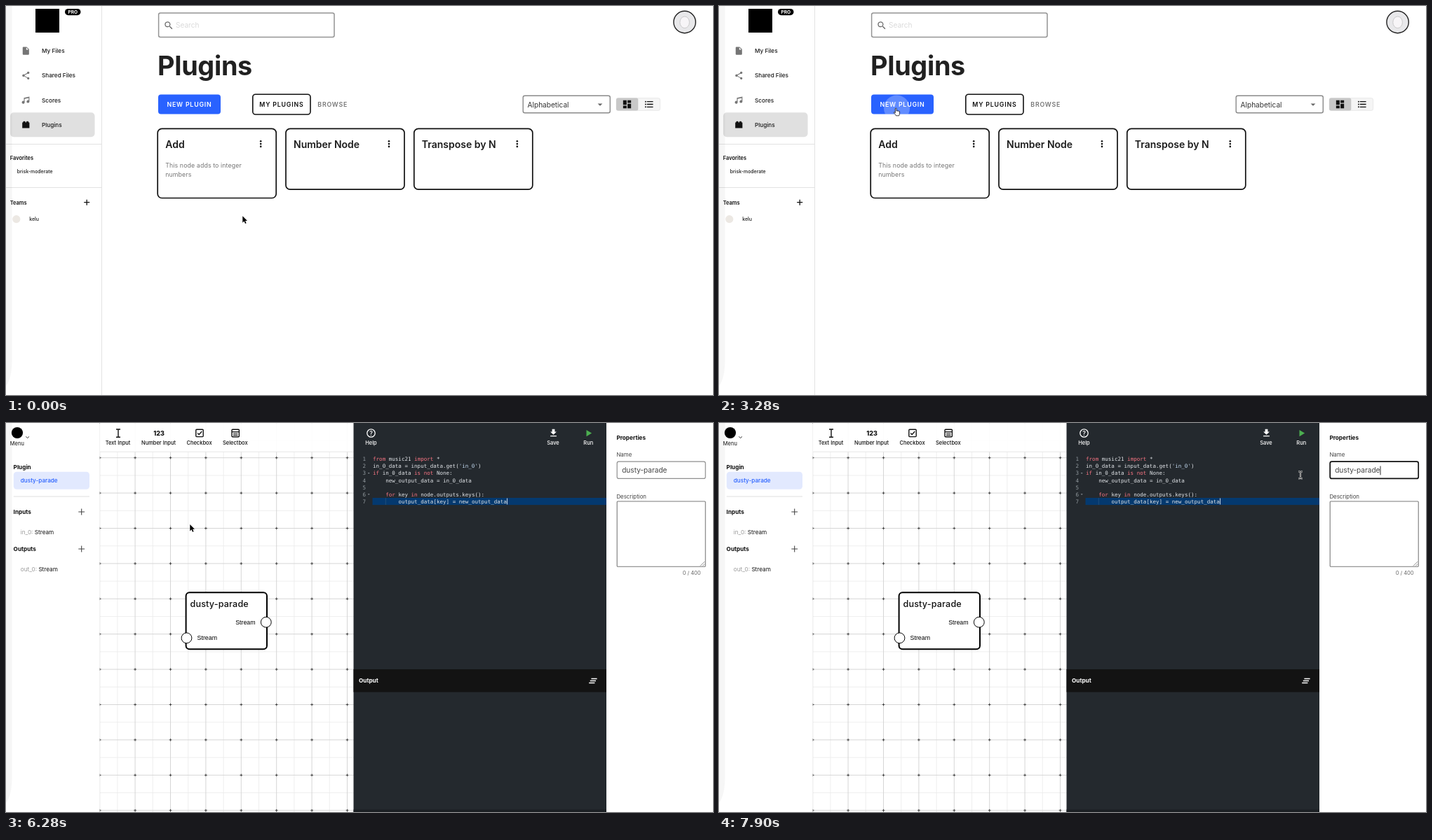
Recreate the animation shown at these times as an HTML page. Size 1008 by 556 pixels, loop 8 s.

```html
<!DOCTYPE html>
<html lang="en">
<head>
<meta charset="utf-8">
<title>Plugin editor</title>
<style>
html, body { margin: 0; width: 100%; height: 100%; overflow: hidden; background: #fff; }
svg { display: block; width: 100vw; height: 100vh; font-family: Inter, sans-serif; }
text { white-space: pre; }
.mono { font-family: "DejaVu Sans Mono", monospace; }
.sans { font-family: "Liberation Sans", Arial, sans-serif; }
</style>
</head>
<body>
<svg id="stage" viewBox="0 0 1008 556"></svg>
<script>
const LOOP = 8000;
const PLUGIN = 'dusty-parade';
const BLUE = '#2962ff';

// Drawing helpers
const text = (s, x, y, size, fill = '#111', weight = 400, extra = '') =>
  `<text x="${x}" y="${y}" font-size="${size}" fill="${fill}" font-weight="${weight}" ${extra}>${s}</text>`;
const mid = (s, x, y, size, fill, weight, extra = '') =>
  text(s, x, y, size, fill, weight, `text-anchor="middle" ${extra}`);
const box = (x, y, x2, y2, r, fill, stroke = 'none', width = 1, extra = '') =>
  `<rect x="${x}" y="${y}" width="${x2 - x}" height="${y2 - y}" rx="${r}" fill="${fill}" stroke="${stroke}" stroke-width="${width}" ${extra}/>`;
const line = (d, stroke, width = 1, extra = '') =>
  `<path d="${d}" fill="none" stroke="${stroke}" stroke-width="${width}" ${extra}/>`;
const dot = (x, y, r, fill, stroke = 'none', width = 1) =>
  `<circle cx="${x}" cy="${y}" r="${r}" fill="${fill}" stroke="${stroke}" stroke-width="${width}"/>`;
const icon = (d, x, y, size, fill) =>
  `<path transform="translate(${x - size / 2} ${y - size / 2}) scale(${size / 24})" d="${d}" fill="${fill}"/>`;
const plus = (x, y, r, color, width) =>
  line(`M${x - r} ${y}h${2 * r}M${x} ${y - r}v${2 * r}`, color, width);

const ICONS = {
  file: 'M13 9V3.5L18.5 9M6 2C4.9 2 4 2.9 4 4V20A2 2 0 0 0 6 22H18A2 2 0 0 0 20 20V8L14 2H6Z',
  share: 'M18 16.1C17.2 16.1 16.6 16.4 16 16.9L8.9 12.7Q9.1 12 8.9 11.3L16 7.2A3 3 0 1 0 15.1 5.7L8 9.8A3 3 0 1 0 8 14.2L15.2 18.3A2.9 2.9 0 1 0 18 16.1Z',
  music: 'M21 3V15.5A3.5 3.5 0 1 1 19 12.3V6.5L9 8.6V17.5A3.5 3.5 0 1 1 7 14.3V6L21 3Z',
  brick: 'M19 6V5A2 2 0 0 0 17 3H15A2 2 0 0 0 13 5V6H11V5A2 2 0 0 0 9 3H7A2 2 0 0 0 5 5V6H3V20H21V6Z',
  search: 'M9.5 3A6.5 6.5 0 0 1 14.4 13.7L14.7 14H15.5L20.5 19L19 20.5L14 15.5V14.7L13.7 14.4A6.5 6.5 0 1 1 9.5 3M9.5 5A4.5 4.5 0 1 0 9.5 14A4.5 4.5 0 1 0 9.5 5Z',
  board: 'M13 3V9H21V3M13 21H21V11H13M3 21H11V15H3M3 13H11V3H3Z',
  list: 'M7 5H21V7H7ZM7 11H21V13H7ZM7 17H21V19H7Z' +
    [6, 12, 18].map(y => `M4 ${y - 1.5}a1.5 1.5 0 1 1 0 3a1.5 1.5 0 1 1 0-3Z`).join(''),
  save: 'M5 20H19V18H5M19 9H15V3H9V9H5L12 16Z'
};

// Faint rounded edge at the left of the window
const edge = '<path d="M0 0H8.6V506Q8.6 532 0 543Z" fill="#000" opacity=".035"/>';

function card(x, bottom, title, lines = []) {
  return box(x, 175.3, x + 169, bottom, 6, '#fff', '#111', 1.7) +
    text(title, x + 11, 202.6, 14, '#1c1c1c', 600) +
    [193.3, 197.1, 200.9].map(y => dot(x + 147, y, 1.3, '#111')).join('') +
    lines.map((s, i) => text(s, x + 11, 231 + i * 12.6, 8.82, '#767676', 400, 'letter-spacing=".1"')).join('');
}

function library() {
  const nav = [['file', 'My Files'], ['share', 'Shared Files'], ['music', 'Scores'], ['brick', 'Plugins']];
  const caps = 'letter-spacing=".79"';
  return box(0, 0, 1008, 556, 0, '#fff') +
    box(6, 152.3, 126.5, 187.3, 5, '#e0e0e0') +
    line('M136.5 0V556M0 197.5H136M0 259.5H136', '#e2e2e2') +
    box(42, 4, 76, 38, 0, '#000') +
    box(84, 4, 106.5, 13.2, 4.6, '#000') +
    mid('PRO', 95.3, 11, 6.6, '#fff', 700) +
    nav.map(([name, label], i) => {
      const y = 64.1 + i * 35.25;
      return icon(ICONS[name], 28.3, y, 13.6, i === 3 ? '#111' : '#757575') +
        text(label, 51, y + 3, 8.19, '#1a1a1a', 500);
    }).join('') +
    text('Favorites', 5.7, 219.6, 7.5, '#111', 600) +
    text('brisk-moderate', 15.8, 238.5, 6.93, '#1a1a1a', 500) +
    text('Teams', 5.7, 283.5, 7.5, '#111', 600) +
    plus(115.2, 280.7, 4, '#111', 1.3) +
    dot(14.8, 304.6, 5.6, '#ece8e3') +
    text('kelu', 33.2, 307, 6.93, '#1a1a1a', 500) +
    edge +
    box(217.6, 10, 468, 44.4, 2.5, '#fff', '#949494', 1.5) +
    icon(ICONS.search, 232, 27.8, 15.1, '#666') +
    text('Search', 242, 31, 10.08, '#dadada') +
    dot(967.6, 23, 15.7, '#e8e8ea', '#222', 1.4) +
    '<ellipse cx="967.6" cy="23.3" rx="6.8" ry="8.3" fill="#f7f5f7" stroke="#bbb" stroke-width=".7"/>' +
    text('Plugins', 216, 99.3, 37.8, '#212121', 700, 'letter-spacing="-.3"') +
    `<rect id="button" x="217" y="126.5" width="89" height="28" rx="4"/>` +
    '<g clip-path="url(#buttonClip)"><circle id="ripple" cx="253.5" cy="146" fill="#fff" opacity=".26"/></g>' +
    text('NEW PLUGIN', 229.5, 143.9, 8.82, '#fff', 600, caps + ' id="buttonText"') +
    box(351.8, 126.2, 434, 155, 4, '#fff', '#111', 1.6) +
    text('MY PLUGINS', 361.3, 143.9, 8.82, '#111', 600, caps) +
    text('BROWSE', 444.3, 143.9, 8.82, '#777', 600, caps) +
    box(737.2, 128.2, 861.3, 152.8, 2.5, '#fff', '#8a8a8a', 1.4) +
    text('Alphabetical', 743.6, 144.6, 10.08, '#333') +
    '<path d="M843.6 139.4h6.8l-3.4 3.4Z" fill="#666"/>' +
    box(870.2, 131.7, 932.6, 149.3, 2.5, '#f5f5f5', '#e4e4e4', .8) +
    box(870, 131.4, 901.3, 149.6, 2.5, '#c8c8c8') +
    icon(ICONS.board, 885.5, 140.5, 15.1, '#111') +
    icon(ICONS.list, 916.9, 140.5, 15.1, '#111') +
    card(216.2, 274.5, 'Add', ['This node adds to integer', 'numbers']) +
    card(399, 262.2, 'Number Node') +
    card(581.8, 262.2, 'Transpose by N');
}

function grid() {
  const step = 50.4, x0 = 133.7, y0 = -0.7;
  let minor = '', major = '', marks = '';
  for (let i = 0; i < 8; i++) {
    const x = x0 + i * step;
    major += `M${x} 0V556`;
    minor += `M${x + step / 2} 0V556`;
    for (let j = 0; j < 12; j++) {
      const y = y0 + j * step;
      marks += `M${x - 1.8} ${y}h3.6M${x} ${y - 1.8}v3.6`;
    }
  }
  for (let j = 0; j < 12; j++) {
    const y = y0 + j * step;
    major += `M134 ${y}H496`;
    minor += `M134 ${y + step / 2}H496`;
  }
  return line(minor, '#ebebeb', .8) + line(major, '#d2d2d2', .9) + line(marks, '#444', 1);
}

function code() {
  const key = s => `<tspan fill="#f97583">${s}</tspan>`;
  const str = s => `<tspan fill="#c5dbf2">${s}</tspan>`;
  const rows = [
    `${key('from')} music21 ${key('import')} *`,
    `in_0_data = input_data.get(${str("'in_0'")})`,
    `${key('if')} in_0_data ${key('is not')} None:`,
    '  new_output_data = in_0_data',
    '',
    `  ${key('for')} key ${key('in')} node.outputs.keys():`,
    '    output_data[key] = new_output_data'
  ];
  const mono = 'class="mono"', w = 4.551;
  return box(522.5, 107, 856, 117.1, 0, '#04396f') +
    line('M541.3 107V117', '#2b5680', .7) +
    rows.map((row, i) => {
      const y = 54.3 + i * 10.08;
      const pad = row.length - row.trimStart().length;
      return text(i + 1, 513, y, 7.56, '#929a9f', 400, mono + ' text-anchor="end"') +
        (i === 2 || i === 5 ? `<path d="M515.7 ${y - 3.4}h3l-1.5 1.8Z" fill="#8a9196"/>` : '') +
        text(row.trimStart(), 523 + pad * 2 * w, y, 7.56, '#e1e4e8', 400, mono);
    }).join('') +
    line('M714.5 107.5V116.5', '#dfe6ee', .9);
}

function editor() {
  const tool = (s, x, fill = '#111') => mid(s, x, 31, 7.5, fill, 500);
  const port = (name, y) => text(`<tspan fill="#999">${name}:</tspan> Stream`, 20.8, y, 8.19, '#111');
  return box(0, 0, 1008, 556, 0, '#fff') + grid() +
    // Graph node
    box(256.6, 242.2, 372, 323.2, 5, '#fff', '#000', 2) +
    text(PLUGIN, 262.5, 262.9, 12.6, '#111', 500, 'letter-spacing=".16"') +
    text('Stream', 327.2, 287.5, 8.82, '#000', 400, 'class="sans"') +
    text('Stream', 272.6, 310.1, 8.82, '#000', 400, 'class="sans"') +
    dot(370.8, 284.7, 7.4, '#fff', '#000', 1) +
    dot(257.5, 307.3, 7.4, '#fff', '#000', 1) +
    // Toolbar
    box(134, 0, 496, 41, 0, '#fff', 'none', 0, 'opacity=".92"') +
    line('M134 41.2H496', '#e6e6e6') +
    line('M157 9h6M157 20.2h6M160 9V20.2', '#111', 1.4) +
    mid('123', 218, 17.6, 9, '#111', 800) +
    box(270.8, 9.2, 281.2, 19.6, 1, 'none', '#111', 1.4) +
    line('M273.2 14.4l2 2l4-4.3', '#111', 1.4) +
    box(322, 9.2, 332.4, 19.8, 1, 'none', '#111', 1.4) +
    line('M322 12.6H332.4M324 15H330.4M324 17.3H330.4', '#111', 1.2) +
    tool('Text Input', 159.6) + tool('Number Input', 217.5) + tool('Checkbox', 275.5) + tool('Selectbox', 326.8) +
    // Left panel
    box(0, 0, 133.6, 556, 0, '#fff') +
    dot(16, 14, 8.1, '#000') +
    line('M28.4 19.3l2.3 2.3l2.3-2.3', '#333', 1) +
    text('Menu', 5.8, 32, 7.5, '#111') +
    text('Plugin', 10.6, 66, 8.2, '#111', 700) +
    box(10.8, 69.8, 119, 94.8, 4.5, '#e2e9fe') +
    text(PLUGIN, 20.8, 85.2, 8.19, BLUE, 500) +
    line('M10.8 105H119', '#dedede') +
    text('Inputs', 10.6, 129.8, 8.2, '#111', 700) +
    text('Outputs', 10.6, 182.8, 8.2, '#111', 700) +
    plus(107.7, 127, 4.4, '#444', 1.1) + plus(107.7, 180, 4.4, '#444', 1.1) +
    port('in_0', 158.8) + port('out_0', 211.8) + edge +
    // Code panel
    box(495.5, 0, 856, 556, 0, '#24292e') +
    dot(520.5, 14.5, 5.7, 'none', '#fff', 1.3) +
    mid('?', 520.5, 17.6, 8.6, '#fff', 600) +
    icon(ICONS.save, 780.5, 14.3, 15.1, '#fff') +
    '<path d="M827.5 10v9.2l7.6-4.6Z" fill="#4caf50"/>' +
    tool('Help', 520.5, '#fff') + tool('Save', 780, '#fff') + tool('Run', 830.3, '#fff') +
    code() +
    box(495.5, 352, 856, 384.6, 0, '#131313') +
    text('Output', 503, 371.2, 8.2, '#fff', 700) +
    line('M834.4 365.5h8.2M832.8 368.5h8.2M831.2 371.5h8.2', '#fff', 1.3) +
    box(495.5, 552.5, 856, 556, 0, '#1b1f23') +
    // Properties
    box(856, 0, 1008, 556, 0, '#fff') +
    text('Properties', 870.4, 23.5, 8.2, '#111', 700) +
    text('Name', 870.4, 48.2, 7.9, '#444') +
    '<rect id="field" x="871.2" y="55.2" width="126" height="24.2" rx="2.5" fill="#fff"/>' +
    text(PLUGIN, 878.2, 71, 10.08, '#444') +
    line('M943 61.5V74.3', '#111', .9, 'id="caret"') +
    text('Description', 870.4, 107.5, 7.9, '#444') +
    box(871.2, 112, 997.2, 205.3, 1, '#fff', '#7a7a7a', 1.1) +
    line('M989.8 204.4l6.4-6.4M993.2 204.4l3-3', '#777', .8) +
    text('0 / 400', 990.6, 217.4, 7.5, '#666', 400, 'text-anchor="end"');
}

const beam = 'M-2.7 -5Q0 -5 0 -3.7V3.7Q0 5 -2.7 5M2.7 -5Q0 -5 0 -3.7M0 3.7Q0 5 2.7 5';
const cursors = `
  <path id="arrow" d="M0 0V9.4L2.2 7.3L3.7 10.8L5.3 10.1L3.8 6.7H6.7Z" fill="#000" stroke="#fff" stroke-width=".9" paint-order="stroke"/>
  <path id="hand" d="M2.6 7.2V1.3a.9.9 0 0 1 1.8 0V4.6a.8.8 0 0 1 1.6.1a.8.8 0 0 1 1.5.3a.7.7 0 0 1 1.3.4V8c0 1.5-.7 2-.8 3.2H3.6C3.3 9.6 1.5 8.4.7 6.9C.3 6 1.4 5.6 2 6.3Z" fill="#fff" stroke="#111" stroke-width=".8"/>
  <g id="beam">${line(beam, '#fff', 2.2)}${line(beam, '#222', 1)}</g>`;

const stage = document.getElementById('stage');
stage.innerHTML = '<defs><clipPath id="buttonClip"><rect x="217" y="126.5" width="89" height="28" rx="4"/></clipPath></defs>' +
  `<g id="library">${library()}</g><g id="editor">${editor()}</g>${cursors}`;
const $ = id => document.getElementById(id);
const show = (id, on) => $(id).setAttribute('display', on ? 'inline' : 'none');
const set = (id, name, value) => $(id).setAttribute(name, value);

// The pointer is sampled coarsely, so it jumps: time, shape, x, y
const path = [
  [0, 'arrow', 337.3, 300.3], [600, 'arrow', 131.9, 261], [740, 'arrow', 146, 132.9],
  [890, 'arrow', 236.9, 124.6], [1040, 'hand', 248.4, 145.3], [2240, 'hand', 248.7, 145.6],
  [3730, 'arrow', 251, 145.3], [6280, 'arrow', 262.3, 145], [6430, 'arrow', 457, 122.6],
  [6580, 'beam', 651, 140], [6720, 'beam', 801, 143], [6870, 'beam', 909.5, 101.7],
  [7020, 'beam', 958, 74], [7160, 'beam', 964.6, 69.3], [7610, 'beam', 955.7, 69.3],
  [7750, 'beam', 875, 70], [7900, 'beam', 829, 74.3]
];

function render(t) {
  const editing = t >= 3730, pressed = t >= 3580, focused = t >= 7160;
  show('library', !editing);
  show('editor', editing);
  set('button', 'fill', pressed ? '#7a9cff' : BLUE);
  set('buttonText', 'fill', pressed ? '#bccbfb' : '#fff');
  set('ripple', 'r', pressed || t < 3280 ? 0 : t < 3430 ? 18.5 : 62);
  set('field', 'stroke', focused ? '#111' : '#8f8f8f');
  set('field', 'stroke-width', t >= 7460 ? 1.7 : focused ? 1.5 : 1.2);
  show('caret', focused && !(t >= 7750 && t < 7900));
  const [, shape, x, y] = path.filter(p => p[0] <= t).pop();
  for (const id of ['arrow', 'hand', 'beam']) show(id, id === shape);
  set(shape, 'transform', `translate(${x} ${y})`);
}

const start = performance.now();
function tick() {
  render((performance.now() - start) % LOOP);
  requestAnimationFrame(tick);
}
tick();
</script>
</body>
</html>
```
